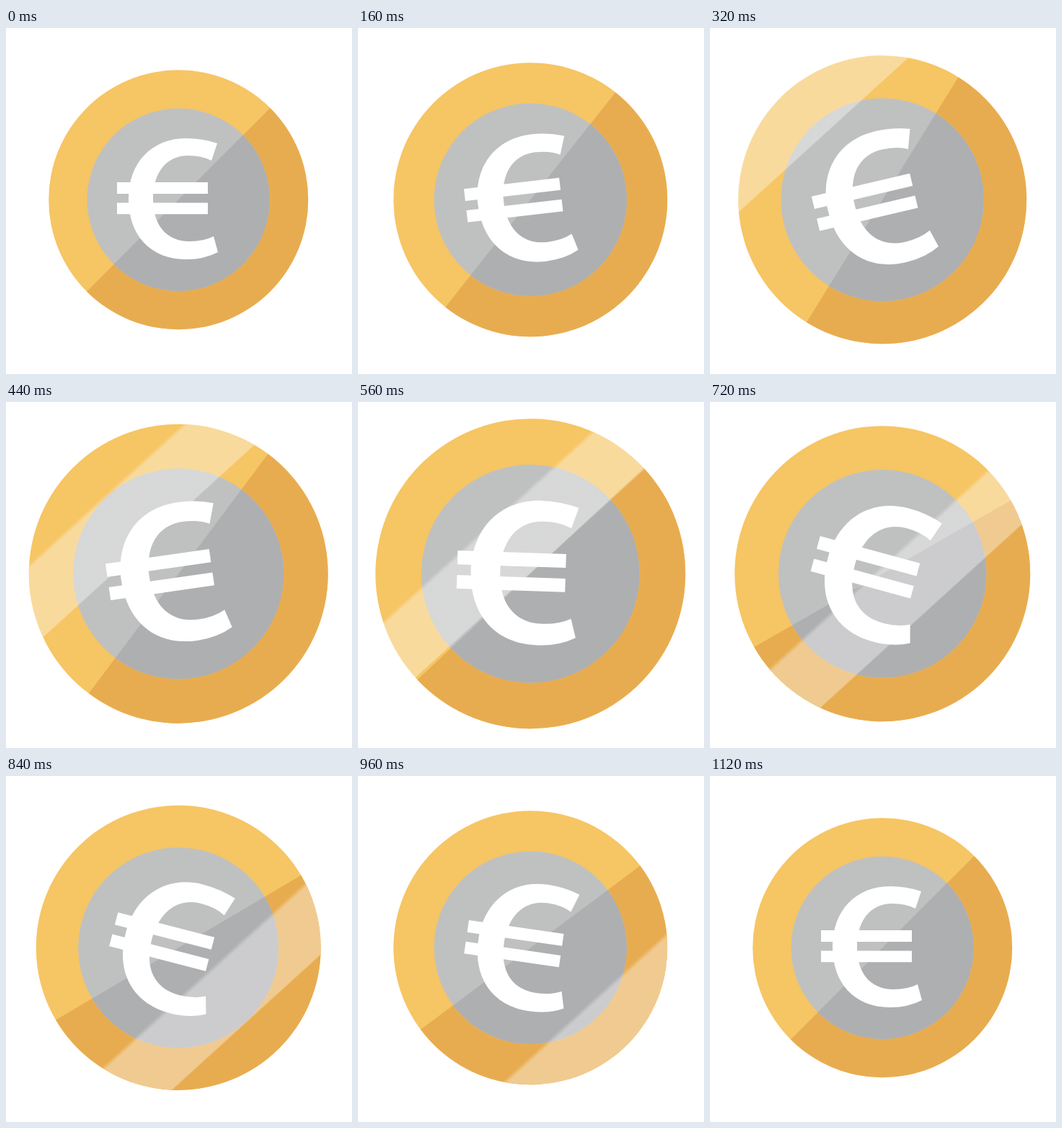
Animation, 480 px wide and 480 px high, one loop 1.16 s. Source, as an HTML page with a canvas:

```html
<!DOCTYPE html>
<html lang="en">
<head>
<meta charset="utf-8">
<title>Euro coin</title>
<style>
html, body { margin: 0; width: 100%; height: 100%; overflow: hidden; background: #fff; }
canvas { display: block; }
</style>
</head>
<body>
<canvas id="stage" width="480" height="480"></canvas>
<script>
const ctx = document.getElementById('stage').getContext('2d');
const CX = 239.2, CY = 238.2, RIM = 180, CORE = 126.7;
const STEP_MS = 40, STEPS = 29, PEAK = 14;
const SHINE_TILT = -42.3, SHINE_WIDTH = 86, SHINE_SPEED = 20.1;

// Drawn in stage coordinates at the smallest coin size
const euro = new Path2D(`M293 160 Q272 153 250 153 C202 153 170 187 170 237
  C170 287 200 321 250 321 Q275 321 294 311 L288 289 Q274 296 255 296
  C222 296 204 273 204 237 C204 201 222 177 253 177 Q272 177 285 184 Z`);

const rad = deg => deg * Math.PI / 180;

// Piecewise linear interpolation through [time, value] pairs
function follow(keys, t) {
  const i = Math.max(1, keys.findIndex(k => k[0] >= t));
  const [t0, v0] = keys[i - 1], [t1, v1] = keys[i];
  return v0 + (v1 - v0) * (t - t0) / (t1 - t0);
}

function disc(radius, color, from = 0, to = 2 * Math.PI) {
  ctx.fillStyle = color;
  ctx.beginPath();
  ctx.arc(0, 0, radius, from, to);
  ctx.fill();
}

function splitDisc(radius, light, dark) {
  disc(radius, light);
  disc(radius, dark, rad(-45), rad(135));
}

function drawCoin(scale, angle) {
  ctx.save();
  ctx.scale(scale, scale);
  ctx.rotate(rad(angle));
  splitDisc(RIM, '#f6c564', '#e8ac50');
  splitDisc(CORE, '#bfc1c0', '#aeafb1');
  ctx.translate(-CX, -CY);
  ctx.fillStyle = '#fff';
  ctx.fill(euro);
  ctx.fillRect(154, 214, 126, 16);
  ctx.fillRect(154, 242.5, 126, 15.7);
  ctx.restore();
}

function drawShine(radius, front) {
  const back = front - SHINE_WIDTH;
  ctx.save();
  ctx.beginPath();
  ctx.arc(0, 0, radius, 0, 2 * Math.PI);
  ctx.clip();
  ctx.rotate(rad(SHINE_TILT));
  const glow = ctx.createLinearGradient(0, back - 3, 0, front + 1);
  glow.addColorStop(0, 'rgba(255,255,255,0)');
  glow.addColorStop(0.07, 'rgba(255,255,255,0.37)');
  glow.addColorStop(0.98, 'rgba(255,255,255,0.37)');
  glow.addColorStop(1, 'rgba(255,255,255,0)');
  ctx.fillStyle = glow;
  ctx.fillRect(-300, back - 3, 600, SHINE_WIDTH + 4);
  ctx.restore();
}

function draw(now) {
  const n = Math.floor(now / STEP_MS) % STEPS;
  const radius = follow([[0, RIM], [PEAK, 215], [28, RIM]], n);
  const angle = follow([[0, 0], [9, -14.9], [19, 18.6], [28, 0]], n);
  ctx.setTransform(1, 0, 0, 1, 0, 0);
  ctx.clearRect(0, 0, 480, 480);
  ctx.translate(CX, CY);
  drawCoin(radius / RIM, angle);
  drawShine(radius, SHINE_SPEED * (n - PEAK) - 1);
}

const start = performance.now();
function tick() {
  draw(performance.now() - start);
  requestAnimationFrame(tick);
}
tick();
</script>
</body>
</html>
```
